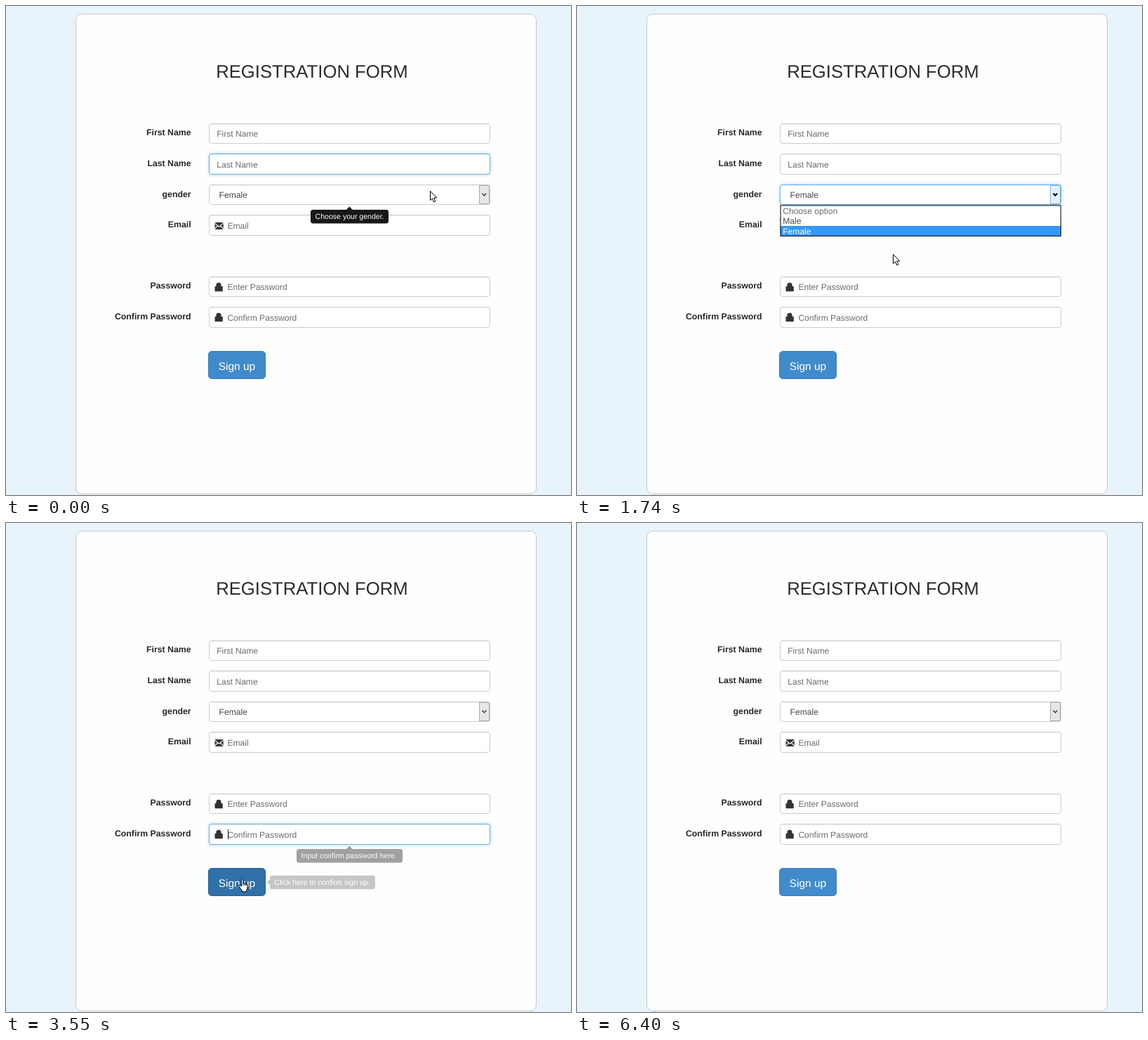
An HTML page that plays this animation: 805 by 696 pixels, repeating every 7380 ms.

```html
<!DOCTYPE html>
<html lang="en">
<head>
<meta charset="utf-8">
<title>Registration form</title>
<style>
  html, body { margin: 0; width: 100%; height: 100%; overflow: hidden; background: #e8f4fb; }
  svg { display: block; width: 805px; height: 696px; }
  text { font: 12.1px "Liberation Sans", Arial, sans-serif; text-rendering: geometricPrecision; white-space: pre; }
  .title { font-size: 25.7px; fill: #2b2b2b; }
  .label { font-size: 12.3px; font-weight: bold; fill: #262626; text-anchor: end; }
  .hint { fill: #6c6c6c; }
  .value { fill: #484848; }
  .field { fill: #fff; stroke: #ccc; }
  .glow { fill: #fff; stroke: #66afe9; filter: drop-shadow(0 0 2.6px rgba(102, 175, 233, .55)); }
  .tip text { font-size: 10.55px; fill: #fff; }
  .send { font-size: 15.4px; fill: #fff; }
  .pointer { fill: #fff; stroke: #000; stroke-linejoin: round; }
</style>
</head>
<body>
<svg id="stage" viewBox="0 0 805 696" xmlns="http://www.w3.org/2000/svg"></svg>
<script>
const LOOP = 7380, FADE = 150, BLINK = 500, PITCH = 43.6, ROW = 14.5;
const stage = document.getElementById('stage');
const el = id => document.getElementById(id);

// When each input has focus and each tooltip is asked for, as [start, end].
const focus = { last: [-FADE, 480], gender: [480, 2680], pass: [2680, 3270], again: [3270, 6220] };
const tips = { gender: [-FADE, 500], pass: [2732, 3270], again: [3270, 3462], button: [3515, 4850] };
const listOpen = [600, 1850];
const onButton = [3500, 4720];

// Key points of the pointer's path: time, x, y.
const path = [
  [0, 604, 263], [270, 687, 275], [420, 682, 271], [930, 680, 271], [1230, 467, 308],
  [1500, 453, 317], [1740, 450, 353], [2370, 442, 380], [2850, 416, 465], [3000, 413, 470],
  [3400, 396, 448], [3550, 331, 506], [4660, 329, 509], [4780, 373, 529], [5050, 746, 660],
  [5410, 744, 700]
];

const text = (x, y, cls, str) => `<text x="${x}" y="${y}" class="${cls}">${str}</text>`;
const rect = (x, y, w, h, attrs) => `<rect x="${x}" y="${y}" width="${w}" height="${h}" ${attrs}/>`;

const mail = y => `<g transform="translate(297 ${y})">
  <path d="M.5 0H12.7V10H.5Z" fill="#333"/>
  <path d="M0 .6L6.5 6.2L13 .6M0 9.7L4.6 5M13 9.7L8.4 5" fill="none" stroke="#fff" stroke-width="1.1"/></g>`;
const lock = y => `<g transform="translate(297 ${y})" fill="#333">
  <path d="M3.2 6V4A2.8 2.8 0 0 1 8.8 4V6" stroke="#333" stroke-width="1.6"/>
  <rect x=".5" y="5.6" width="11.3" height="7.4" rx=".8"/></g>`;

const rowY = i => 167 + PITCH * i;
function field(id, i, label, hint, icon) {
  const y = rowY(i), top = Math.floor(y), h = Math.floor(y + 28.6) - top;
  const box = attrs => rect(289.5, top + .5, 400, h, `rx="3.4" ${attrs}`);
  return text(263.6, y + 17.3, 'label', label) + box('class="field"')
    + (focus[id] ? box(`class="glow" id="${id}Glow"`) : '')
    + `<path d="M291 ${top + 1.5}H688" stroke="#000" stroke-opacity=".05"/>`
    + (icon ? icon(top + 8.3) : '')
    + text(icon ? 315.4 : 300.2, y + 18.9, 'hint', hint);
}
const caret = (id, i) => rect(316, Math.floor(rowY(i)) + 8, 1, 14, `id="${id}Caret" fill="#222"`);

const bubble = (id, x, y, w, str, arrow) => `<g id="${id}Tip" class="tip">`
  + rect(x, y, w, 19.5, 'rx="3.4"') + `<path d="${arrow}"/>` + text(x + 6.6, y + 13, '', str) + '</g>';
function tipBelow(id, i, w, str) {
  const y = Math.floor(rowY(i)) + 36;
  return bubble(id, 489.5 - w / 2, y, w, str, `M484.9 ${y}l4.4 -4.4l4.4 4.4Z`);
}

const arrowButton = (id, fill, edge, ink, weight) => `<g id="${id}">`
  + rect(674.5, 255.5, 14, 26, `fill="${fill}" stroke="${edge}"`)
  + `<path d="M678.5 266.8l2.9 3l2.9 -3" fill="none" stroke="${ink}" stroke-width="${weight}"/></g>`;

const options = ['Choose option', 'Male', 'Female'];
const optionY = i => Math.round(283.9 + ROW * i);
const optionRow = (str, i) => `<g id="row${i}">`
  + rect(290, optionY(i), 399, optionY(i + 1) - optionY(i), '') + text(293.2, optionY(i) + 12.2, '', str) + '</g>';

stage.innerHTML = `
  ${rect(0, 0, 805, 696, 'fill="#e8f4fb"')}
  ${rect(99.5, 11.5, 656, 683, 'rx="8.5" fill="#fefefe" stroke="#c3cad2"')}
  ${text(299.2, 101.8, 'title', 'REGISTRATION FORM')}
  ${field('first', 0, 'First Name', 'First Name')}
  ${field('last', 1, 'Last Name', 'Last Name')}
  ${field('gender', 2, 'gender', '')}
  ${text(303.6, 273, 'value', 'Female')}
  ${arrowButton('plain', '#e6e6e6', '#adadad', '#444', 1.5)}
  ${arrowButton('active', '#e5f0fc', '#86b4e4', '#000', 2)}
  ${field('email', 3, 'Email', 'Email', y => mail(y + 2.7))}
  ${field('pass', 5, 'Password', 'Enter Password', lock)}
  ${field('again', 6, 'Confirm Password', 'Confirm Password', lock)}
  ${caret('pass', 5)}${caret('again', 6)}
  ${rect(288.5, 491.5, 81, 39, 'id="button" rx="4.6"')}
  ${text(302.8, 517.6, 'send', 'Sign up')}
  ${tipBelow('gender', 2, 111, 'Choose your gender.')}
  ${tipBelow('pass', 5, 135, 'Input your password here.')}
  ${tipBelow('again', 6, 151, 'Input confirm password here.')}
  ${bubble('button', 376, 501.7, 150, 'Click here to confirm sign up.', 'M376.4 507l-4.4 4.4l4.4 4.4Z')}
  <g id="list">${options.map(optionRow).join('')}
    ${rect(290, 283.9, 399.3, 43.5, 'fill="none" stroke="#000"')}</g>
  <path id="arrow" class="pointer" d="M.5 .5V13.6L3.5 10.9L5.6 16L7.8 15L5.7 10.1H9.8Z"/>
  <path id="hand" class="pointer" d="M4.3 11.2V1.9Q4.4 .5 5.5 .5Q6.7 .5 6.8 1.9V6.3Q8.7 5.4 9 6.9Q10.7 6.2 11 7.8
    Q12.9 7.3 13 9V13Q12.8 15.5 11.6 16.6V18.8H5.2V16.8Q3 14.6 1.9 12.2Q.2 9.8 .8 9.2Q2 8.6 4.3 11.2Z
    M6.8 6.3V10M9 6.9V10M11 7.8V10.2"/>`;

const clamp = v => Math.min(1, Math.max(0, v));
const within = ([start, end], t) => t >= start && t < end;
const fade = ([start, end], t) => clamp((t - start) / FADE) * (1 - clamp((t - end) / FADE));
const blink = (span, t) => within(span, t) && (t - span[0]) % (2 * BLINK) < BLINK;
const show = (id, amount) => { el(id).style.opacity = Number(amount); };

function pointerAt(t) {
  const next = path.findIndex(p => p[0] > t);
  if (next < 0) return path.at(-1).slice(1);
  const [t0, x0, y0] = path[next - 1], [t1, x1, y1] = path[next];
  const k = (t - t0) / (t1 - t0);
  return [x0 + (x1 - x0) * k, y0 + (y1 - y0) * k].map(Math.round);
}

function draw(t) {
  for (const id in focus) show(id + 'Glow', fade(focus[id], t));
  for (const id in tips) show(id + 'Tip', .9 * fade(tips[id], t));
  for (const id of ['pass', 'again']) show(id + 'Caret', blink(focus[id], t));
  show('active', within([400, focus.gender[1]], t));
  show('list', within(listOpen, t));

  const [x, y] = pointerAt(t), hand = within(onButton, t);
  for (const id of ['arrow', 'hand']) el(id).setAttribute('transform', `translate(${x} ${y})`);
  show('hand', hand);
  show('arrow', !hand);

  // The option under the pointer is lit; the chosen one otherwise.
  const lit = y >= optionY(1) && y < optionY(2) ? 1 : 2;
  options.forEach((_, i) => {
    const [back, label] = el('row' + i).children;
    back.setAttribute('fill', i === lit ? '#3399ff' : '#fff');
    label.setAttribute('fill', i === lit ? '#fff' : i ? '#484848' : '#6c6c6c');
  });

  const hover = within(tips.button, t);
  el('button').setAttribute('fill', hover ? '#3071a9' : '#428bca');
  el('button').setAttribute('stroke', hover ? '#285e8e' : '#357ebd');
}

function tick() {
  draw(performance.now() % LOOP);
  requestAnimationFrame(tick);
}
tick();
</script>
</body>
</html>
```
